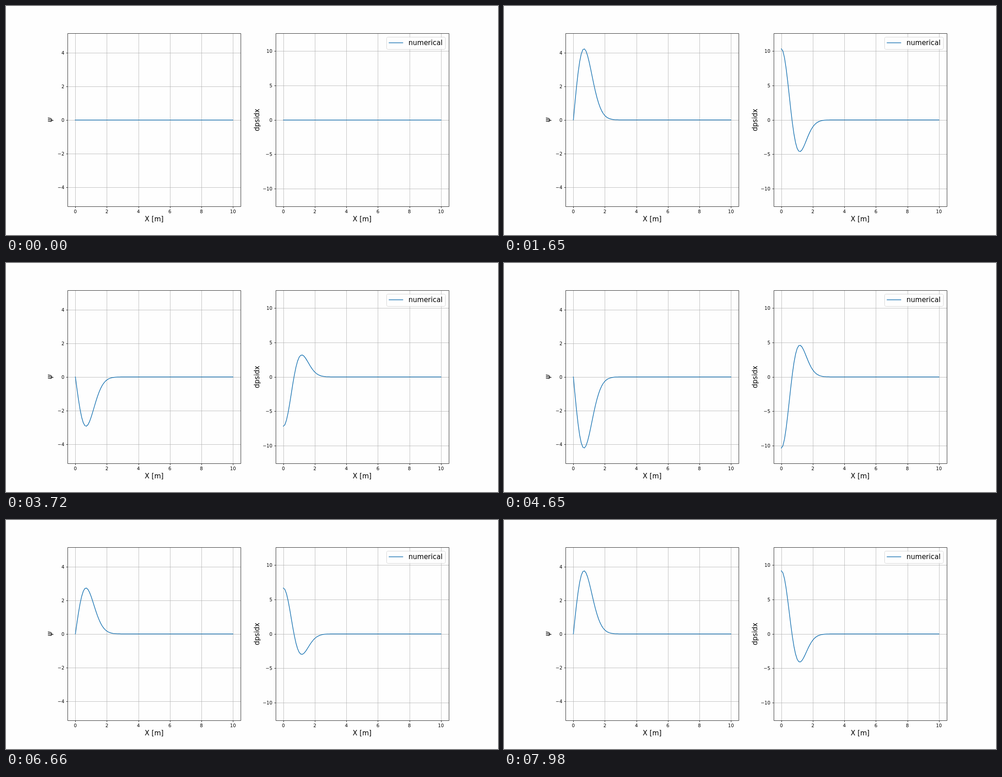
Recreate the animation shown at these times as an HTML page. Size 1080x504 px, loop 8000 ms.

```html
<!DOCTYPE html>
<html lang="en">
<head>
<meta charset="utf-8">
<title>Oscillating wave and its slope</title>
<style>
  html, body { margin: 0; width: 100%; height: 100%; overflow: hidden; background: #fefefe; }
  svg { display: block; width: 1080px; height: 504px; font-family: "DejaVu Sans", sans-serif; }
  .grid { stroke: #b0b0b0; stroke-width: .8; }
  .axis { stroke: #000; stroke-width: .8; fill: none; }
  .curve { stroke: #1f77b4; stroke-width: 1.5; fill: none; stroke-linecap: square; stroke-linejoin: round; }
  .tick { font-size: 10px; }
  .label { font-size: 15px; }
</style>
</head>
<body>
<svg id="stage" viewBox="0 0 1080 504"></svg>
<script>
const LOOP = 8000, STEP = 30, HALF = 100;   // ms, ms, steps per half wave
const TOP = 60.48, BOTTOM = 441, MID = 250.74, WIDTH = 380.45;
const K = 10.46, A = 1.096;                 // psi = K x exp(-A x^2)

const stage = document.getElementById('stage');

function add(tag, attrs, text) {
  const el = document.createElementNS('http://www.w3.org/2000/svg', tag);
  for (const key in attrs) el.setAttribute(key, attrs[key]);
  if (text) el.textContent = text;
  stage.appendChild(el);
  return el;
}
const snap = v => Math.floor(v + .5) + .5;
const path = (cls, d) => add('path', { class: cls, d });
const text = (cls, x, y, anchor, str, more) =>
  add('text', { class: cls, x, y, 'text-anchor': anchor, ...more }, str);
const sideways = (x, str, more) =>
  text('label', 0, 0, 'middle', str, { transform: `translate(${x} ${MID}) rotate(-90)`, ...more });

function makePlot(left, scale, ticks, shape) {
  const x0 = left + WIDTH / 22, unit = WIDTH / 11;
  const l = snap(left), r = snap(left + WIDTH), t = snap(TOP), b = snap(BOTTOM);
  const xs = [0, 2, 4, 6, 8, 10].map(v => [v, x0 + v * unit / 1.1 * 1.1 * (10 / 10)]);
  for (const [, x] of xs) path('grid', `M${snap(x)} ${t}V${b}`);
  for (const v of ticks) path('grid', `M${l} ${snap(MID - v * scale)}H${r}`);
  const curve = path('curve', '');
  for (const [v, x] of xs) {
    path('axis', `M${snap(x)} ${b}v3.5`);
    text('tick', x, 456, 'middle', String(v));
  }
  for (const v of ticks) {
    const y = MID - v * scale;
    path('axis', `M${l} ${snap(y)}h-3.5`);
    text('tick', left - 7, Math.round(y + 3.8), 'end', String(v).replace('-', '\u2212'));
  }
  path('axis', `M${l} ${t}H${r}V${b}H${l}Z`);
  text('label', left + WIDTH / 2, 474, 'middle', 'X [m]');

  return amp => {
    if (!amp) {
      curve.setAttribute('d', `M${Math.round(x0)} 251H${Math.round(x0 + 10 * unit)}`);
      return;
    }
    let d = '';
    for (let i = 0; i <= 100; i++) {
      const x = i / 10, y = MID - amp * shape(x) * scale;
      d += `${i ? 'L' : 'M'}${(x0 + x * unit).toFixed(2)} ${y.toFixed(2)}`;
    }
    curve.setAttribute('d', d);
  };
}

const psi = x => K * x * Math.exp(-A * x * x);
const slope = x => K * (1 - 2 * A * x * x) * Math.exp(-A * x * x);
const plots = [
  makePlot(135, 37, [-4, -2, 0, 2, 4], psi),
  makePlot(591.55, 15.15, [-10, -5, 0, 5, 10], slope)
];
sideways(101, '\u03c8', { 'font-style': 'italic' });
sideways(556, 'dpsidx');

// legend
add('rect', { x: 835.5, y: 68.5, width: 129, height: 27, rx: 3,
  fill: '#fff', stroke: '#ccc', opacity: .8 });
path('curve', 'M841 81H871');
text('label', 883.5, 86, 'start', 'numerical');

function draw(ms) {
  const k = Math.floor(ms % LOOP / STEP);
  const amp = k % HALF ? Math.sin(Math.PI * k / HALF) : 0;
  for (const plot of plots) plot(amp);
}
function tick() {
  draw(performance.now());
  requestAnimationFrame(tick);
}
draw(0);
requestAnimationFrame(tick);
</script>
</body>
</html>
```
